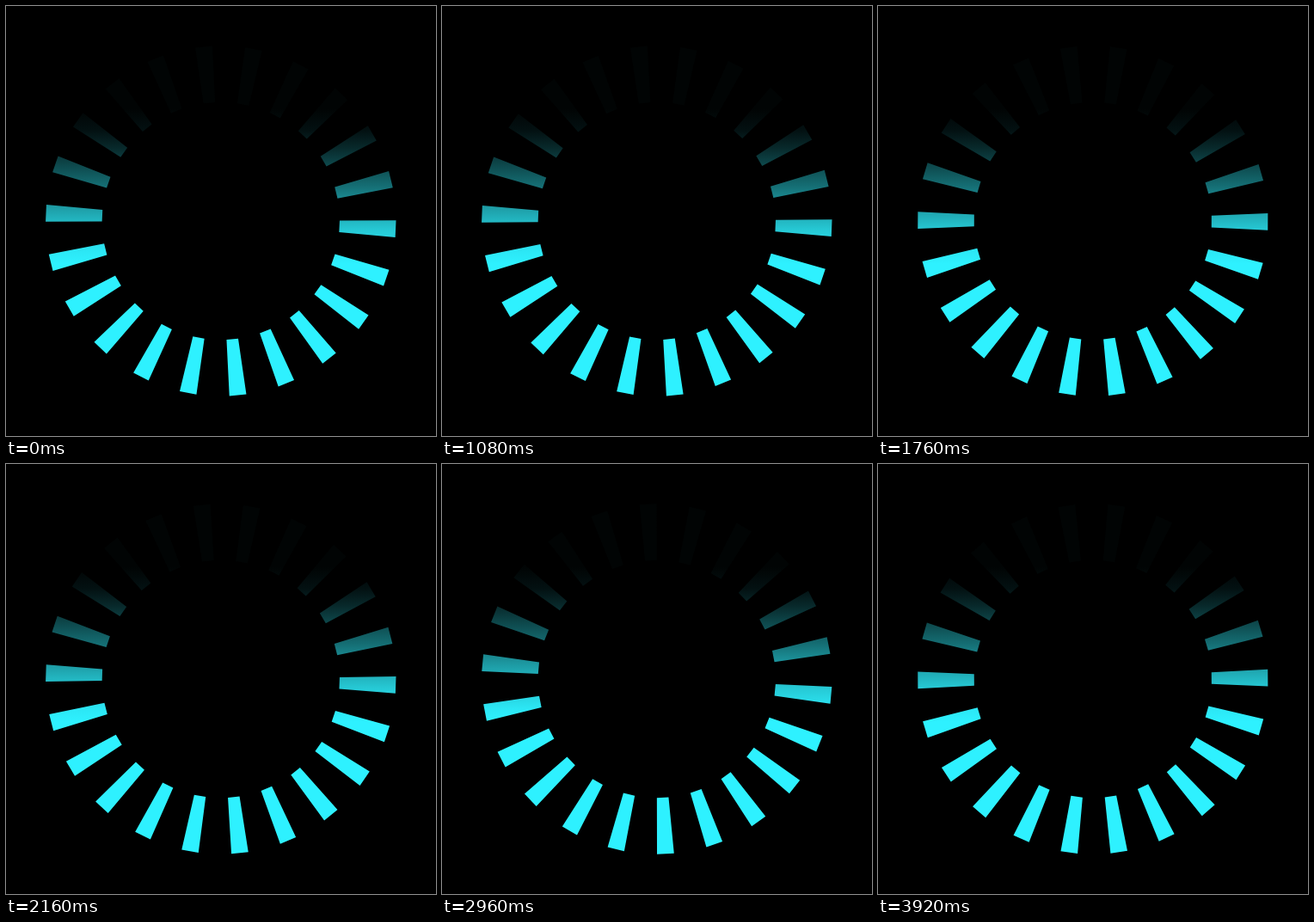
Write an HTML page with a canvas that moves like this. It is 500 px wide and 500 px high and loops after 3.96 s.

```html
<!DOCTYPE html>
<html lang="en">
<head>
<meta charset="utf-8">
<style>
  html, body { margin: 0; width: 100%; height: 100%; overflow: hidden; background: #000; }
  canvas { display: block; width: 500px; height: 500px; }
</style>
</head>
<body>
<canvas id="stage" width="500" height="500"></canvas>
<script>
const ctx = document.getElementById('stage').getContext('2d');
const LOOP = 3960, STEP = 40;
const CENTER = { x: 249.8, y: 250 };
const BARS = 22, INNER = 138, OUTER = 203.5;
const INNER_HALF = 6.8, OUTER_HALF = 9.9;
const START_ANGLE = 2.6, TURN_PER_STEP = 1.806;

// The light stays still while the bars turn through it: [y, brightness].
const LIGHT = [
  [45, 0.015], [120, 0.015], [145, 0.07], [165, 0.17],
  [190, 0.33], [210, 0.46], [232, 0.63], [260, 0.83], [285, 0.96], [300, 1]
];
const glow = ctx.createLinearGradient(0, 0, 0, 500);
for (const [y, level] of LIGHT) {
  const [r, g, b] = [46, 241, 255].map(c => Math.round(c * level));
  glow.addColorStop(y / 500, `rgb(${r},${g},${b})`);
}

function addBar(angle) {
  const cos = Math.cos(angle), sin = Math.sin(angle);
  const corner = (along, across) => [
    CENTER.x + along * cos - across * sin,
    CENTER.y + along * sin + across * cos
  ];
  ctx.moveTo(...corner(INNER, -INNER_HALF));
  ctx.lineTo(...corner(OUTER, -OUTER_HALF));
  ctx.lineTo(...corner(OUTER, OUTER_HALF));
  ctx.lineTo(...corner(INNER, INNER_HALF));
  ctx.closePath();
}

function draw(time) {
  const step = Math.floor((time % LOOP) / STEP);
  const turn = (START_ANGLE + step * TURN_PER_STEP) * Math.PI / 180;
  ctx.fillStyle = '#000';
  ctx.fillRect(0, 0, 500, 500);
  ctx.beginPath();
  for (let i = 0; i < BARS; i++) addBar(turn + i * 2 * Math.PI / BARS);
  ctx.fillStyle = glow;
  ctx.fill();
}

function tick() {
  draw(performance.now());
  requestAnimationFrame(tick);
}
tick();
</script>
</body>
</html>
```
